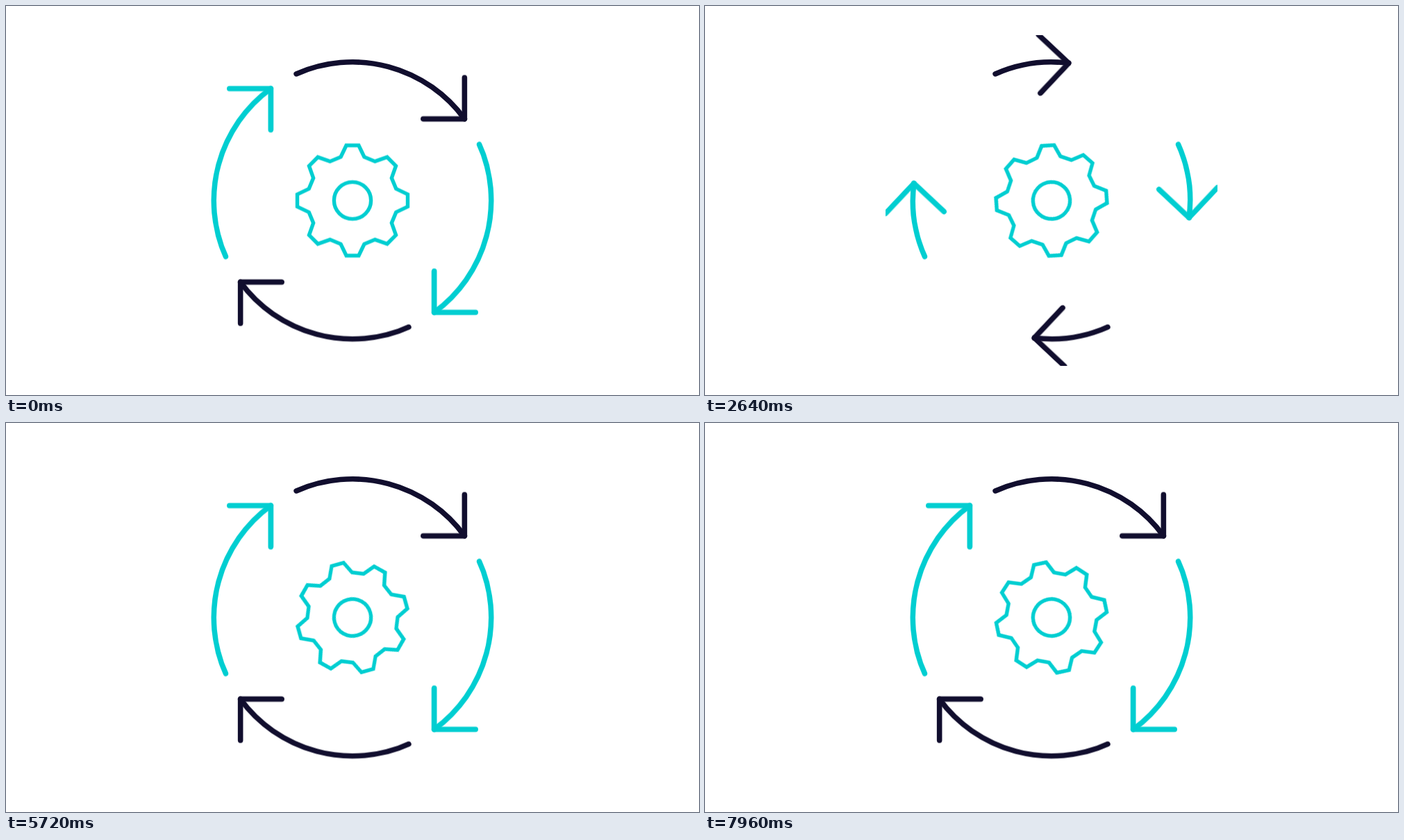
Animation, 998 px wide and 561 px high, one loop 8000 ms. Source, as an HTML page:

```html
<!DOCTYPE html>
<html lang="en">
<head>
<meta charset="utf-8">
<title>Cycle</title>
<style>
  html, body { margin: 0; width: 100%; height: 100%; overflow: hidden; background: #fff; }
  svg { display: block; width: 100vw; height: 100vh; }
  path, circle { fill: none; stroke: currentColor; }
  .arrow path { stroke-width: 7.6; stroke-linecap: round; stroke-linejoin: round; }
  .gear { color: #00ced1; stroke-width: 5.4; animation: turn 8s linear infinite; }
  .shaft { stroke-dasharray: 1 2; animation: draw 4s linear infinite; }
  .head { animation: travel 4s linear infinite; }
  .gear, .head { transform-origin: 0 0; }

  @keyframes turn { to { transform: rotate(-147.7deg); } }

  /* Arrows rest complete, vanish at once, then grow back. */
  @keyframes draw {
    0%, 49.24% { stroke-dashoffset: 0; }
    49.25% { stroke-dashoffset: 1; animation-timing-function: cubic-bezier(.25, 0, .5, 1); }
    98%, 100% { stroke-dashoffset: 0; }
  }
  @keyframes travel {
    0%, 49.24% { transform: rotate(0deg); }
    49.25% { transform: rotate(-77.8deg); animation-timing-function: cubic-bezier(.25, 0, .5, 1); }
    98%, 100% { transform: rotate(0deg); }
  }
</style>
</head>
<body>
<svg viewBox="0 0 998 561">
  <clipPath id="frame"><rect x="260" y="42" width="478" height="477"/></clipPath>
  <g clip-path="url(#frame)"><g id="arrows" transform="translate(499 280.5)"></g></g>
  <g transform="translate(499 280.5)">
    <g class="gear">
      <path id="teeth"/>
      <circle r="26.6"/>
    </g>
  </g>
</svg>
<script>
  const RADIUS = 199.7, TAIL = -23.9, TIP = 53.9, ARM = 59.5;
  const colors = ['#110e2e', '#00ced1'];

  // Angles are in degrees, clockwise from the top.
  const polar = (radius, deg) => {
    const a = deg * Math.PI / 180;
    return [radius * Math.sin(a), -radius * Math.cos(a)];
  };

  const tip = polar(RADIUS, TIP);
  const shaft = `M${polar(RADIUS, TAIL)}A${RADIUS} ${RADIUS} 0 0 1 ${tip}`;
  const head = `M${tip[0]} ${tip[1] - ARM}v${ARM}h${-ARM}`;

  document.getElementById('arrows').innerHTML = [0, 1, 2, 3].map(i => `
    <g class="arrow" color="${colors[i % 2]}" transform="rotate(${i * 90})">
      <path class="shaft" pathLength="1" d="${shaft}"/>
      <path class="head" d="${head}"/>
    </g>`).join('');

  const tooth = [[65, -15.1], [80, -6.4], [80, 6.4], [65, 15.1]];
  const outline = Array.from({ length: 8 }, (_, i) =>
    tooth.map(([radius, deg]) => polar(radius, deg + i * 45)).join('L'));
  document.getElementById('teeth').setAttribute('d', `M${outline.join('L')}Z`);
</script>
</body>
</html>
```
